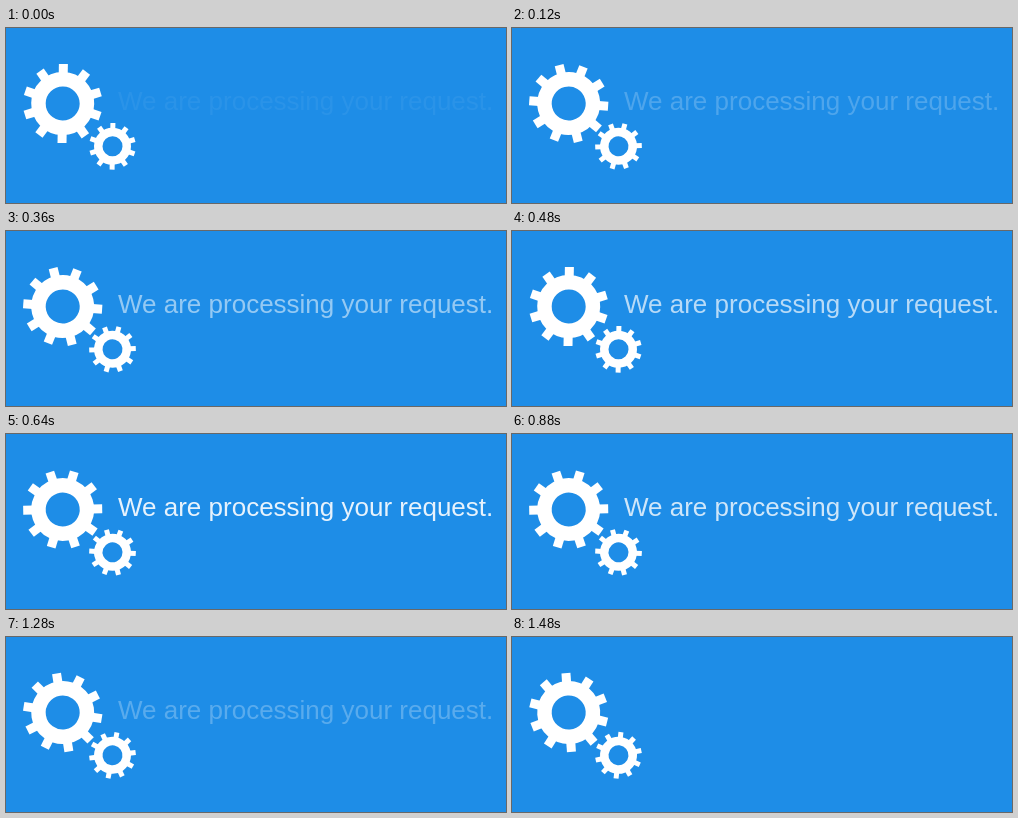
Animation, 500 px wide and 175 px high, one loop 1.52 s. Source, as an HTML page:

```html
<!DOCTYPE html>
<html lang="en">
<head>
<meta charset="utf-8">
<style>
  html, body { margin: 0; width: 100%; height: 100%; overflow: hidden; background: #1e8de7; }
  svg { display: block; }
  text { font: 26px "Liberation Sans", Arial, sans-serif; fill: #fff; }
</style>
</head>
<body>
<svg width="500" height="175" viewBox="0 0 500 175">
  <g id="big"></g>
  <g id="small"></g>
  <text id="label" x="112" y="82">We are processing your request.</text>
</svg>
<script>
const STEP = 40, STEPS = 38, CYCLE = 6, TEETH = 10;
const $ = id => document.getElementById(id);

function buildGear(el, hole, body, tip, toothWidth) {
  const teeth = Array.from({ length: TEETH }, (_, i) =>
    `<rect x="${-toothWidth / 2}" y="${-tip}" width="${toothWidth}" height="${tip - body + 2}"
      transform="rotate(${i * 360 / TEETH})" fill="#fff"/>`);
  el.innerHTML = `<circle r="${(hole + body) / 2}" fill="none" stroke="#fff"
    stroke-width="${body - hole}"/>` + teeth.join('');
}

buildGear($('big'), 17, 31.5, 39.5, 9);
buildGear($('small'), 10, 18.5, 23.3, 5);

function draw(now) {
  const step = Math.floor(now / STEP) % STEPS;
  const turn = 5 * (step % CYCLE);
  $('big').setAttribute('transform', `translate(56.7 75.5) rotate(${1 - turn})`);
  $('small').setAttribute('transform', `translate(106.5 118.3) rotate(${1 + turn})`);
  $('label').setAttribute('opacity', 1 - Math.abs(step - 18) / 19);
}

const start = performance.now();
function tick() {
  draw(performance.now() - start);
  requestAnimationFrame(tick);
}
tick();
</script>
</body>
</html>
```
